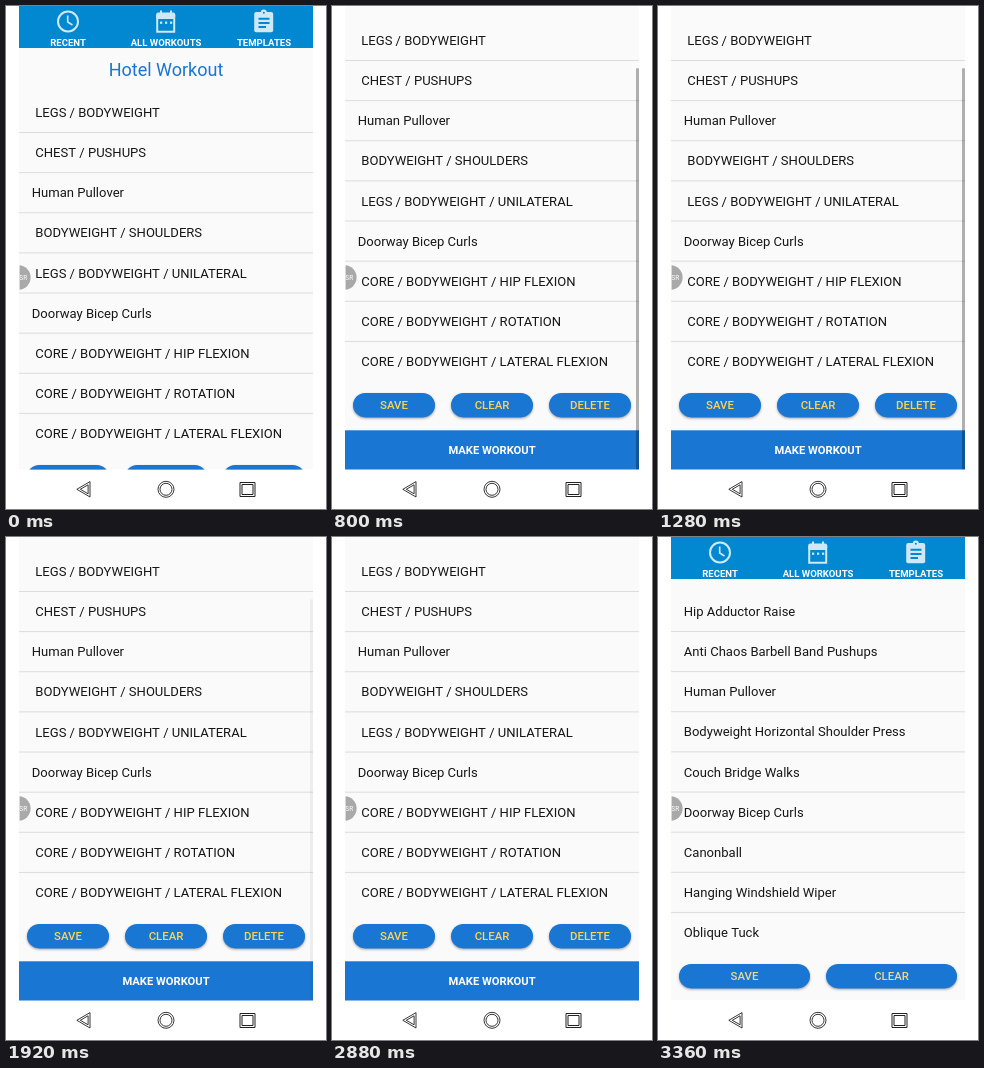
These frames come from a looping animation (320 px wide and 503 px high, 6.88 s). An HTML page with a canvas:

```html
<!DOCTYPE html>
<html lang="en">
<head>
<meta charset="utf-8">
<title>Workout app</title>
<style>
  html, body { margin: 0; width: 100%; height: 100%; overflow: hidden; background: #fff; }
  canvas { display: block; width: 320px; height: 503px; }
</style>
</head>
<body>
<canvas></canvas>
<script>
const LOOP = 6880;
const LEFT = 13, WIDTH = 294, VIEW = 463.5, CONTENT = 535.5, ROW = 40.13;
const BLUE = '#1976d2', SKY = '#0288d1', PALE = '#cfe8f6', PAPER = '#fafafa';

const groups = [
  'LEGS / BODYWEIGHT', 'CHEST / PUSHUPS', 'Human Pullover',
  'BODYWEIGHT / SHOULDERS', 'LEGS / BODYWEIGHT / UNILATERAL', 'Doorway Bicep Curls',
  'CORE / BODYWEIGHT / HIP FLEXION', 'CORE / BODYWEIGHT / ROTATION',
  'CORE / BODYWEIGHT / LATERAL FLEXION'
];
const exercises = [
  'Hip Adductor Raise', 'Anti Chaos Barbell Band Pushups', 'Human Pullover',
  'Bodyweight Horizontal Shoulder Press', 'Couch Bridge Walks', 'Doorway Bicep Curls',
  'Canonball', 'Hanging Windshield Wiper', 'Oblique Tuck'
];

const ratio = window.devicePixelRatio || 1;

function setUp(canvas) {
  canvas.width = 320 * ratio;
  canvas.height = 503 * ratio;
  const context = canvas.getContext('2d');
  context.scale(ratio, ratio);
  return context;
}

const screen = setUp(document.querySelector('canvas'));
const layer = setUp(document.createElement('canvas'));
let ctx = screen;

// Paints on a separate layer, so that overlapping shapes fade as one.
function faded(opacity, paint) {
  ctx = layer;
  ctx.clearRect(0, 0, 320, 503);
  paint();
  ctx = screen;
  ctx.globalAlpha = opacity;
  ctx.drawImage(layer.canvas, 0, 0, 320, 503);
  ctx.globalAlpha = 1;
}

function rect(x, y, w, h, color) {
  ctx.fillStyle = color;
  ctx.fillRect(x, y, w, h);
}

function disc(x, y, r, color) {
  ctx.fillStyle = color;
  ctx.beginPath();
  ctx.arc(x, y, r, 0, 7);
  ctx.fill();
}

function roundRect(x, y, w, h, r, color) {
  ctx.fillStyle = color;
  ctx.beginPath();
  ctx.roundRect(x, y, w, h, r);
  ctx.fill();
}

function stroke(path, color, width) {
  ctx.strokeStyle = color;
  ctx.lineWidth = width;
  ctx.stroke(new Path2D(path));
}

function text(string, x, y, size, color, weight = 400, align = 'center') {
  ctx.font = `${weight} ${size}px Roboto, sans-serif`;
  ctx.textAlign = align;
  ctx.fillStyle = color;
  ctx.fillText(string, x, y);
}

function header() {
  rect(LEFT, 0, WIDTH, 42, SKY);

  // clock
  stroke('M72 15.5a10 10 0 1 1-20 0a10 10 0 1 1 20 0', PALE, 2);
  stroke('M61.7 9.5V16L66.5 19', PALE, 1.6);

  // calendar
  roundRect(150.2, 6.5, 19, 6.5, 2, PALE);
  stroke('M151.2 9V25.7H168.2V9', PALE, 2);
  for (const x of [154, 164]) rect(x, 4.5, 2, 3, PALE);
  for (const x of [154, 159, 164]) rect(x, 15.6, 2.2, 2.2, PALE);

  // clipboard
  roundRect(248.2, 6, 19, 20.3, 2, PALE);
  disc(257.8, 6.5, 3, PALE);
  disc(257.8, 6.8, 1, SKY);
  stroke('M252.5 12.8H263.5M252.5 16.9H263.5M252.5 21H260', SKY, 2);

  text('RECENT', 62, 39.5, 9.55, '#fff', 700);
  text('ALL WORKOUTS', 160, 39.5, 9.55, '#fff', 700);
  text('TEMPLATES', 258, 39.5, 9.55, '#fff', 700);
}

function list(items, baseline) {
  items.forEach((item, i) => {
    const y = baseline + i * ROW;
    const indent = item.includes('/') ? 29.3 : 25.8;
    text(item, indent, y, 13.05, '#171717', 400, 'left');
    if (i < items.length - 1) rect(LEFT, y + 14.9, WIDTH, 1, '#dcdcdc');
  });
}

function pill(label, x, y, w, color) {
  ctx.save();
  ctx.shadowColor = 'rgba(0,0,0,.35)';
  ctx.shadowBlur = 2.5 * ratio;
  ctx.shadowOffsetY = 1.2 * ratio;
  roundRect(x, y, w, 24.4, 12.2, BLUE);
  ctx.restore();
  text(label, x + w / 2, y + 16.4, 11.4, color, 500);
}

function page(top, paint) {
  ctx.save();
  ctx.beginPath();
  ctx.rect(LEFT, 0, WIDTH, VIEW + top);
  ctx.clip();
  rect(LEFT, 0, WIDTH, VIEW + top, PAPER);
  rect(LEFT, 0, WIDTH, top, BLUE);
  ctx.translate(0, top);
  paint();
  ctx.restore();
}

function groupPage(scroll, barOpacity, pressed) {
  page(0, () => {
    ctx.save();
    ctx.translate(0, -scroll);
    header();
    text('Hotel Workout', 160, 69.6, 18, BLUE);
    list(groups, 111.1);
    ['SAVE', 'CLEAR', 'DELETE'].forEach((label, i) =>
      pill(label, 21 + 98 * i, 459, 82, '#ffd54f'));
    rect(LEFT, 496.3, WIDTH, 40, BLUE);
    text('MAKE WORKOUT', 160, 520.2, 11.2, pressed ? '#111' : '#fff', 700);
    ctx.restore();

    const scale = VIEW / CONTENT;
    rect(304, scroll * scale, 3, VIEW * scale, `rgba(0,0,0,${barOpacity})`);
  });
}

function exercisePage(top) {
  page(top, () => {
    header();
    list(exercises, 79.1);
    pill('SAVE', 21, 427, 131, '#f0d88c');
    pill('CLEAR', 168, 427, 131, '#f0d88c');
  });
}

function chrome() {
  ctx.save();
  ctx.beginPath();
  ctx.rect(LEFT + 0.6, 250, 40, 40);
  ctx.clip();
  disc(12.4, 271.5, 12.2, '#a9a9a9');
  text('SR', 17.2, 274, 6.5, '#fff');
  ctx.restore();

  stroke('M70.8 483.3L84 475.6V491Z M74.3 483.3L82.1 478.8V487.8Z', '#222', 0.9);
  stroke('M168 483.3a8 8 0 1 1-16 0a8 8 0 1 1 16 0 M166 483.3a6 6 0 1 1-12 0a6 6 0 1 1 12 0', '#222', 0.9);
  stroke('M234 476.5H249V490.5H234Z', '#222', 1);
  stroke('M236 478.5H247V488.5H236Z', '#222', 1);
}

function draw(now) {
  const t = now % LOOP;
  const scroll = t < 640 ? 0 : t < 800 ? 8 : 72;
  const barOpacity = t < 640 ? 0 : t < 1760 ? 0.3 : t < 1920 ? 0.17 : t < 2880 ? 0.05 : 0;

  rect(0, 0, 320, 503, '#fff');
  if (t < 3200) {
    groupPage(scroll, barOpacity, false);
  } else if (t < 3360) {
    rect(LEFT, VIEW, WIDTH, 7, '#000');
    groupPage(scroll, 0, true);
    faded(0.93, () => exercisePage(7));
  } else {
    exercisePage(0);
  }
  chrome();
}

function tick() {
  draw(performance.now());
  requestAnimationFrame(tick);
}
tick();
</script>
</body>
</html>
```
